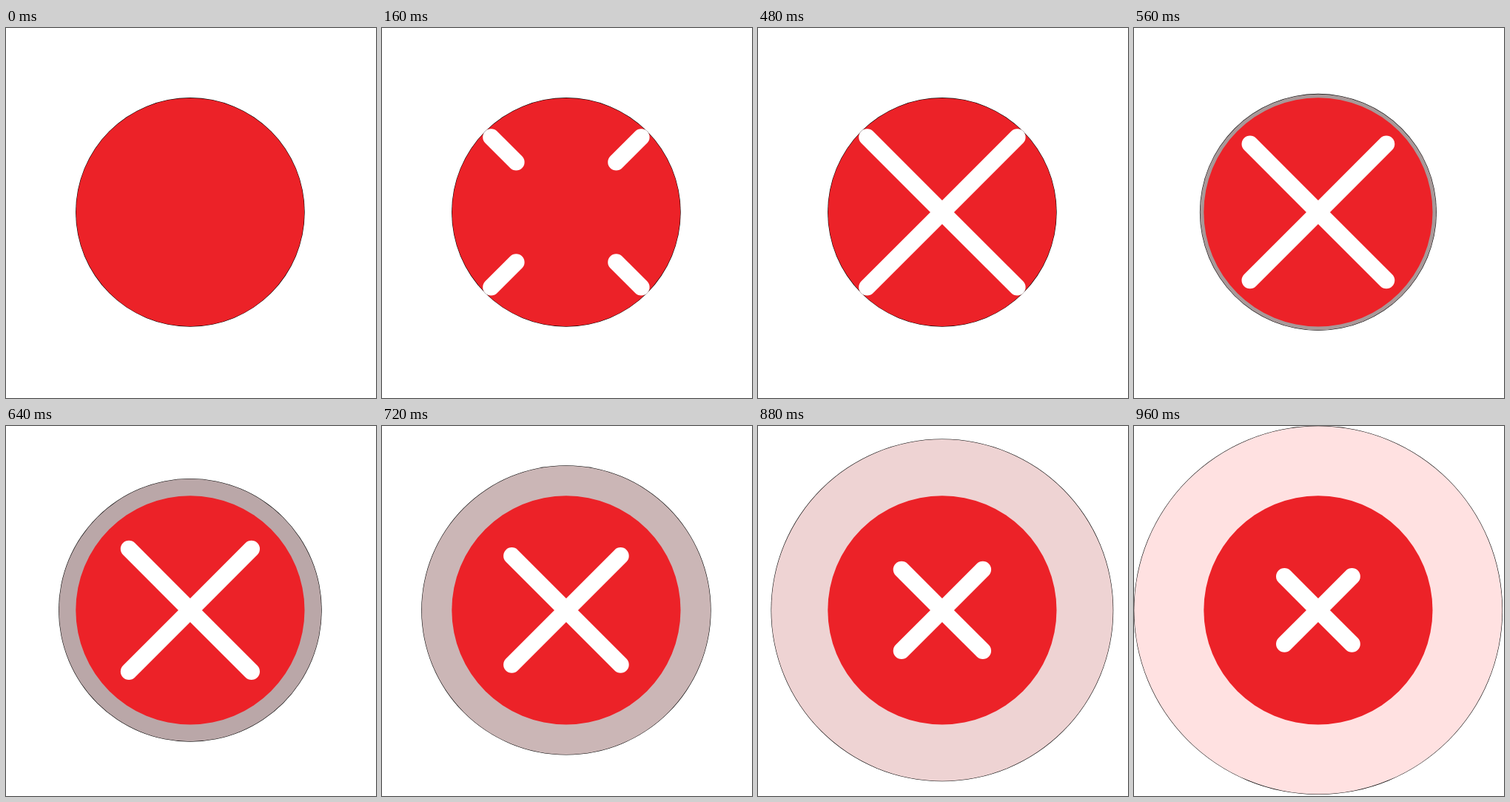
Animation of 500 by 500 pixels, one loop 1.64 s. Source, as an HTML page with a canvas:

```html
<!DOCTYPE html>
<html lang="en">
<head>
<meta charset="utf-8">
<title>Error mark</title>
<style>
html, body { margin: 0; width: 100%; height: 100%; overflow: hidden; background: #fff; }
canvas { display: block; width: 100vw; height: 100vh; }
</style>
</head>
<body>
<canvas id="stage" width="500" height="500"></canvas>
<script>
const ctx = document.getElementById('stage').getContext('2d');
const LOOP = 1640, STEP = 40, JOIN = 480, END = 960;
const C = 248.9, RADIUS = 154.6, ARM = 101.4, ARM_END = 45.6;

const mix = (a, b, k) => a + (b - a) * k;
const clamp = v => Math.min(1, Math.max(0, v));

function disc(r, color) {
  ctx.fillStyle = color;
  ctx.beginPath();
  ctx.arc(C, C, r, 0, Math.PI * 2);
  ctx.fill();
}

// Disc with a hairline dark rim
function rimmedDisc(r, color) {
  disc(r + 0.2, '#000');
  disc(r - 0.35, color);
}

function haloColor(k) {
  const shade = mix(138, 225, k);
  return `rgb(${mix(151, 255, k)}, ${shade}, ${shade + 1 - k})`;
}

function cross(outer, inner) {
  ctx.beginPath();
  for (const sx of [-1, 1]) {
    for (const sy of [-1, 1]) {
      ctx.moveTo(C + sx * outer, C + sy * outer);
      ctx.lineTo(C + sx * inner, C + sy * inner);
    }
  }
  ctx.strokeStyle = '#fff';
  ctx.lineWidth = 22.6;
  ctx.lineCap = 'round';
  ctx.stroke();
}

function draw(t) {
  const grow = clamp(t / JOIN);
  const settle = clamp((t - JOIN) / (END - JOIN));
  const halo = mix(142, 249, settle);

  ctx.fillStyle = '#fff';
  ctx.fillRect(0, 0, 500, 500);
  if (halo > RADIUS) {
    rimmedDisc(halo, haloColor(settle));
    disc(RADIUS, '#ec2228');
  } else {
    rimmedDisc(RADIUS, '#ec2228');
  }
  if (grow > 0) cross(mix(ARM, ARM_END, settle), ARM * (1 - grow));
}

const start = performance.now();
function tick() {
  const t = (performance.now() - start) % LOOP;
  draw(Math.floor(t / STEP) * STEP);
  requestAnimationFrame(tick);
}
tick();
</script>
</body>
</html>
```
